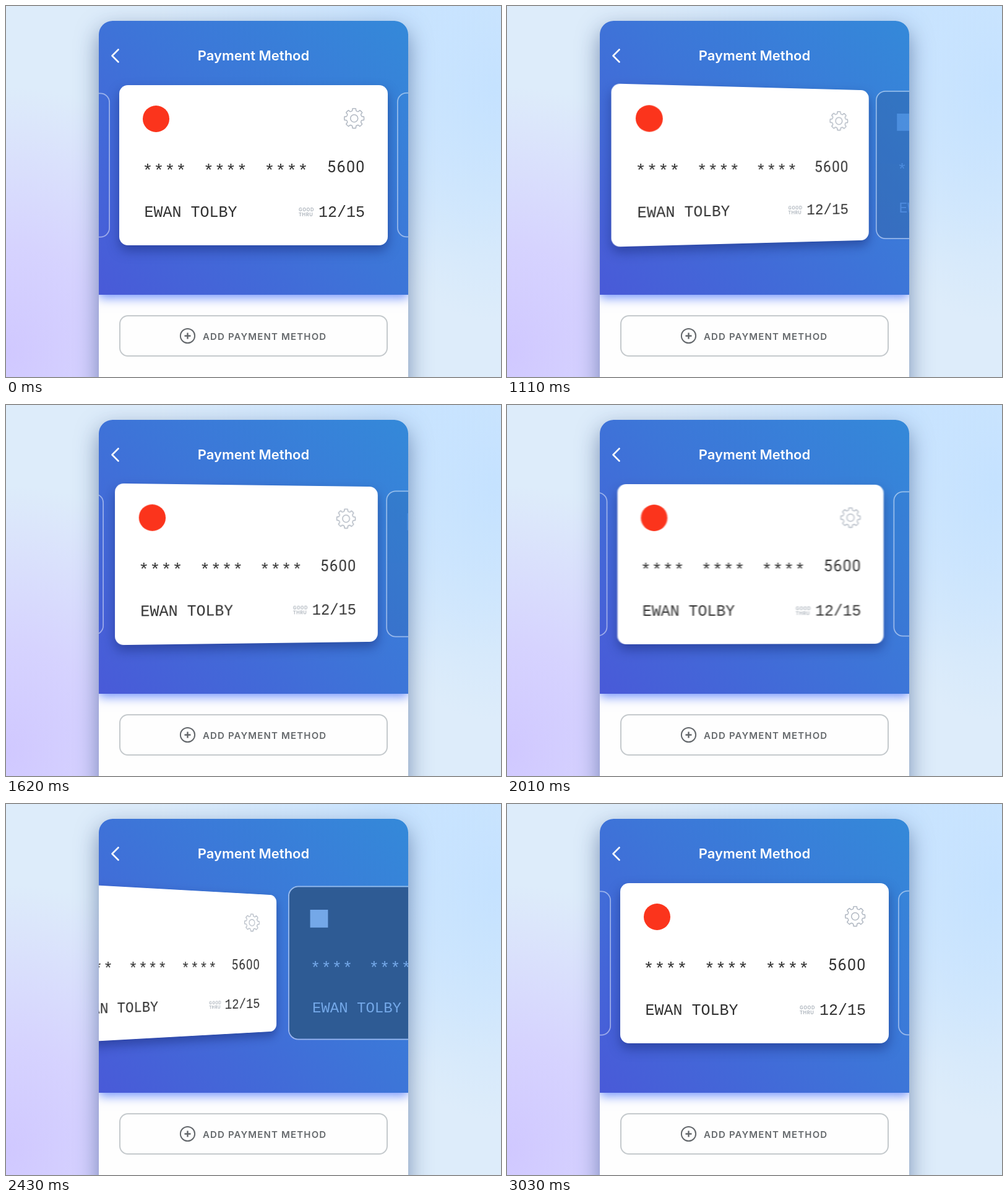
Recreate the animation shown at these times as an HTML page. Size 800 by 600 pixels, loop 3.63 s.

```html
<!DOCTYPE html>
<html lang="en">
<head>
<meta charset="utf-8">
<title>Payment Method</title>
<style>
  html, body { margin: 0; width: 100%; height: 100%; overflow: hidden; }
  body {
    position: relative;
    background:
      radial-gradient(circle at 0 560px, #d0c8ff 0, #d5d0ffe6 170px, #d8dcff00 430px),
      radial-gradient(ellipse 260px 380px at 790px 130px, #c5e2ff, #c5e2ff00),
      radial-gradient(circle at 640px 0, #c9e4ff, #c9e4ff00 420px),
      #ddecfa;
  }
  .phone, .header, .card, .face, svg { position: absolute; }
  .phone {
    left: 150px; top: 24px; width: 500px; height: 640px;
    border-radius: 22px 22px 0 0; overflow: hidden; background: #fefefe;
  }
  .glow {
    position: absolute; left: 150px; top: 24px; width: 500px; height: 640px;
    border-radius: 22px; box-shadow: 0 14px 36px rgba(36, 66, 120, .55);
  }
  .header {
    left: 0; top: 0; width: 500px; height: 443px;
    background: linear-gradient(45deg, #495ad8, #3d75d8 52%, #3489d9);
    box-shadow: 0 5px 16px rgba(70, 112, 250, .75);
  }
  .card {
    left: 33px; top: 104px; width: 434px; height: 259px;
    box-sizing: border-box; border-radius: 14px;
  }
  .side { border: 2px solid rgba(255, 255, 255, .48); border-radius: 17px; }
  #next { transform-origin: 0 50%; }
  #prev { transform-origin: 100% 50%; }
  #main { background: #fff; box-shadow: 0 9px 18px rgba(22, 40, 115, .5); }
  .face { inset: 0; border-radius: 15px; background: #2e5b94; opacity: 0; }
  .side svg { left: -2px; top: -2px; }
  .card svg { width: 434px; height: 259px; }
  .ui { left: 0; top: 0; }
  text { white-space: pre; }
  .ocr { font: 25px "Liberation Mono", monospace; }
  .stars { font: 28px "Liberation Mono", monospace; letter-spacing: 1.2px; }
  .digits { font: 25px Roboto, sans-serif; letter-spacing: 1.4px; }
  .thru { font: 700 7.5px Inter, sans-serif; letter-spacing: .6px; }
  .title { font: 600 22px Inter, sans-serif; }
  .label { font: 600 15px Inter, sans-serif; letter-spacing: 1.15px; }
</style>
</head>
<body>
<div class="glow"></div>
<div class="phone">
  <div class="header"></div>
  <div class="card side" id="prev"></div>
  <div class="card side" id="next"><div class="face"></div></div>
  <div class="card" id="main"></div>
</div>
<svg class="ui" width="800" height="600" fill="none">
  <filter id="smear" x="-.1" y="-.1" width="1.2" height="1.3" color-interpolation-filters="sRGB">
    <feGaussianBlur stdDeviation="0 0"/>
  </filter>
  <path d="M181.5 70.5L171.5 80.5L181.5 90.5" stroke="#fff" stroke-width="2.6" stroke-linecap="round" stroke-linejoin="round"/>
  <text class="title" x="400" y="88" text-anchor="middle" fill="#fff">Payment Method</text>
  <rect x="184" y="501" width="432" height="65" rx="13" stroke="#c5cacd" stroke-width="2"/>
  <g stroke="#64686c" stroke-width="2">
    <circle cx="293.5" cy="533.5" r="11.6"/>
    <path d="M288.5 533.5h10M293.5 528.5v10" stroke-width="2.4"/>
  </g>
  <text class="label" x="318" y="540" fill="#65696c">ADD PAYMENT METHOD</text>
</svg>
<script>
const LOOP = 3630, STEP = 30;
const $ = s => document.querySelector(s);
const main = $('#main'), next = $('#next'), prev = $('#prev');
const face = $('.face'), blur = $('#smear feGaussianBlur');

function gear(cx, cy) {
  const at = (r, a) => `${(cx + r * Math.sin(a)).toFixed(2)} ${(cy - r * Math.cos(a)).toFixed(2)}`;
  let d = '';
  for (let i = 0; i < 8; i++) {
    const a = i * Math.PI / 4;
    d += `${i ? 'L' : 'M'}${at(12.8, a - .24)}L${at(15.9, a - .17)}A16 16 0 0 1 ${at(15.9, a + .17)}` +
      `L${at(12.8, a + .24)}Q${at(11.6, a + .39)} ${at(12.8, a + .545)}`;
  }
  return `<g fill="none" stroke="#b3bac4" stroke-width="1.6" stroke-linejoin="round">
    <path d="${d}Z"/><circle cx="${cx}" cy="${cy}" r="6"/></g>`;
}

const cardArt = (ink, soft, mark, extra = '') => `<svg viewBox="183 128 434 259" fill="${ink}">
  ${mark}${extra}
  ${[0, 1, 2].map(i => `<text class="stars" x="${220.6 + i * 98.5}" y="275">****</text>`).join('')}
  <text class="digits" x="519" y="269">5600</text>
  <text class="ocr" x="223.5" y="341">EWAN TOLBY</text>
  <g class="thru" fill="${soft}"><text x="473" y="332">GOOD</text><text x="473" y="340">THRU</text></g>
  <text class="ocr" x="505" y="341">12/15</text></svg>`;

main.innerHTML = cardArt('#303030', '#b0b7bf',
  '<circle cx="242.5" cy="182.5" r="21.5" fill="#fb341c"/>', gear(562.7, 181.7));
face.innerHTML = cardArt('#74a8e8', '#74a8e8',
  '<rect x="220" y="168" width="30" height="30"/>');

// width, shift, tilt, height | next x, scale | prev x, scale | next fade
const REST = [1, 0, 0, 1, 632, .905, 168, .903, 0];
const DRAGS = [
  { times: [810, 1230, 1380, 1800], by: [-.057, -17.9, .00025, -.03, -45, .0275, -25.5, -.046, .42] },
  { times: [1950, 2430, 2645, 3030], by: [-.208, -131.5, .00039, -.079, -176, .056, -130, -.08, 1.15] }
];

function ease(t, from, to) {
  const x = Math.min(1, Math.max(0, (t - from) / (to - from)));
  return x * x * (3 - 2 * x);
}

function pose(t) {
  const out = REST.slice();
  for (const { times: [a, b, c, d], by } of DRAGS) {
    const p = ease(t, a, b) - ease(t, c, d);
    by.forEach((v, i) => out[i] += v * p);
  }
  return out;
}

function draw(t) {
  const [w, x, tilt, h, nx, ns, px, ps, fade] = pose(t);
  const smear = Math.abs(x - pose(t - STEP)[1]) * .2;
  main.style.transform = `matrix3d(${w},0,0,${tilt.toFixed(7)},0,${h},0,0,0,0,1,0,${x.toFixed(3)},0,0,1)`;
  main.style.filter = smear > .05 ? 'url(#smear)' : 'none';
  blur.setAttribute('stdDeviation', `${smear.toFixed(2)} 0`);
  next.style.transform = `translate(${nx - 183}px,-.5px) scale(${ns})`;
  prev.style.transform = `translate(${px - 617}px,0) scale(${ps})`;
  face.style.opacity = Math.min(1, fade);
}

const start = performance.now();
function tick() {
  const t = (performance.now() - start) % LOOP;
  draw(t - t % STEP);
  requestAnimationFrame(tick);
}
tick();
</script>
</body>
</html>
```
